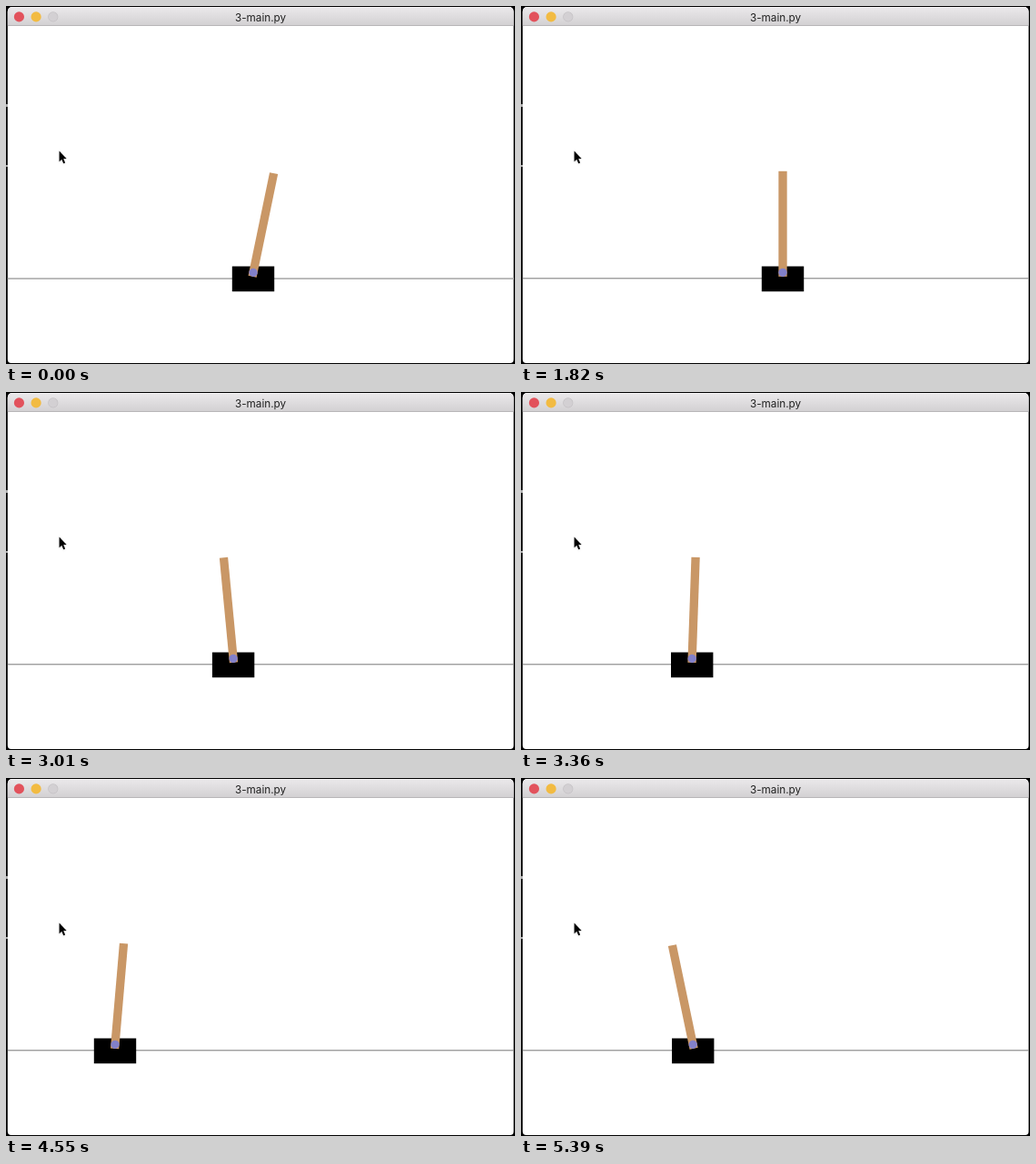
Write an HTML page with a canvas that moves like this. It is 560x394 px and loops after 5.67 s.

```html
<!DOCTYPE html>
<html>
<head>
<meta charset="utf-8">
<style>
html, body { margin: 0; width: 100%; height: 100%; overflow: hidden; background: #000; }
canvas { display: block; }
</style>
</head>
<body>
<canvas id="stage" width="560" height="394"></canvas>
<script>
const ctx = document.getElementById('stage').getContext('2d');
const LOOP = 5670, STEP = 70, RESET = 1050, FAIL = 5390;
const LEFT = 1.8, TOP = 1, WIDTH = 556.7, HEIGHT = 392;

// Turning points of the run: time in ms, cart centre in px, pole tilt in degrees
const poses = [
  [RESET, 280, 1], [1820, 288, 0], [2240, 297, -4.5], [2660, 297.2, -10.4], [3360, 188.2, 2],
  [3780, 131.6, 5.8], [4550, 120, 4.9], [4760, 137.7, 2.6], [FAIL, 189.2, -11.8]
];

// Smooth cubic curve through column c of the poses
function curve(c, t) {
  const last = poses.length - 1;
  const rate = k => (poses[k + 1][c] - poses[k][c]) / (poses[k + 1][0] - poses[k][0]);
  const slope = k => {
    if (k === 0) return rate(0);
    if (k === last) return rate(last - 1);
    const before = poses[k][0] - poses[k - 1][0], after = poses[k + 1][0] - poses[k][0];
    return (rate(k - 1) * after + rate(k) * before) / (before + after);
  };
  let i = 0;
  while (i < last - 1 && t > poses[i + 1][0]) i++;
  const d = poses[i + 1][0] - poses[i][0], u = (t - poses[i][0]) / d, w = 1 - u, r = rate(i);
  return poses[i][c] + d * (r * u + u * w * ((slope(i) - r) * w - (slope(i + 1) - r) * u));
}

function rect(x, y, w, h, color) {
  ctx.fillStyle = color;
  ctx.fillRect(x, y, w, h);
}

function panel(h, radii, fill) {
  ctx.beginPath();
  ctx.roundRect(LEFT, TOP, WIDTH, h, radii);
  ctx.fillStyle = fill;
  ctx.fill();
}

function disc(x, y, r, color) {
  ctx.beginPath();
  ctx.arc(x, y, r, 0, 7);
  ctx.fillStyle = color;
  ctx.fill();
}

function drawWindow() {
  rect(0, 0, 560, 394, '#000');
  rect(0, 108, 2, 3, '#aaa');
  rect(0, 175, 2, 2, '#aaa');
  panel(HEIGHT, [5, 5, 4, 4], '#fff');

  const bar = ctx.createLinearGradient(0, TOP, 0, 21);
  bar.addColorStop(0, '#f6f5f6');
  bar.addColorStop(0.08, '#e9e7e9');
  bar.addColorStop(1, '#d3d1d3');
  panel(20, [5, 5, 0, 0], bar);
  rect(LEFT, 21, WIDTH, 1, '#b8b6b8');

  ['#e2525c', '#f2bb42', '#c4c1c4'].forEach((color, i) => disc(14.4 + 18.7 * i, 11.9, 5.6, color));
  disc(51.8, 11.9, 4.9, '#d3d0d3');

  ctx.fillStyle = '#222';
  ctx.font = '11.7px Inter, Roboto, sans-serif';
  ctx.textAlign = 'center';
  ctx.fillText('3-main.py', 280, 16.5);
}

function drawCursor() {
  ctx.save();
  ctx.translate(58.6, 159.5);
  ctx.scale(0.93, 0.95);
  ctx.shadowColor = 'rgba(0,0,0,.2)';
  ctx.shadowBlur = 1.5;
  ctx.shadowOffsetY = 1;
  ctx.fillStyle = '#000';
  ctx.fill(new Path2D('M0 0V12.4L2.9 9.8 5 14.6 7 13.7 4.9 9H8.6Z'));
  ctx.restore();
}

function drawCartPole(x, tilt) {
  rect(x - 23.2, 286.5, 46.4, 27.7, '#000');
  ctx.save();
  ctx.translate(x, 293.3);
  ctx.rotate(tilt * Math.PI / 180);
  rect(-4.65, -111.5, 9.3, 116, '#c99766');
  disc(0, 0, 4.65, '#8280c9');
  ctx.restore();
}

function draw(time) {
  const t = Math.min(Math.floor(time % LOOP / STEP) * STEP, FAIL);
  drawWindow();
  if (t < STEP) rect(LEFT, 299, WIDTH, 2, '#bbb');
  else rect(LEFT, 299.3, WIDTH, 1, '#777');
  if (t < RESET) drawCartPole(272, 11.7);
  else drawCartPole(curve(1, t), curve(2, t));
  drawCursor();
}

const start = performance.now();
function tick() {
  draw(performance.now() - start);
  requestAnimationFrame(tick);
}
tick();
</script>
</body>
</html>
```
